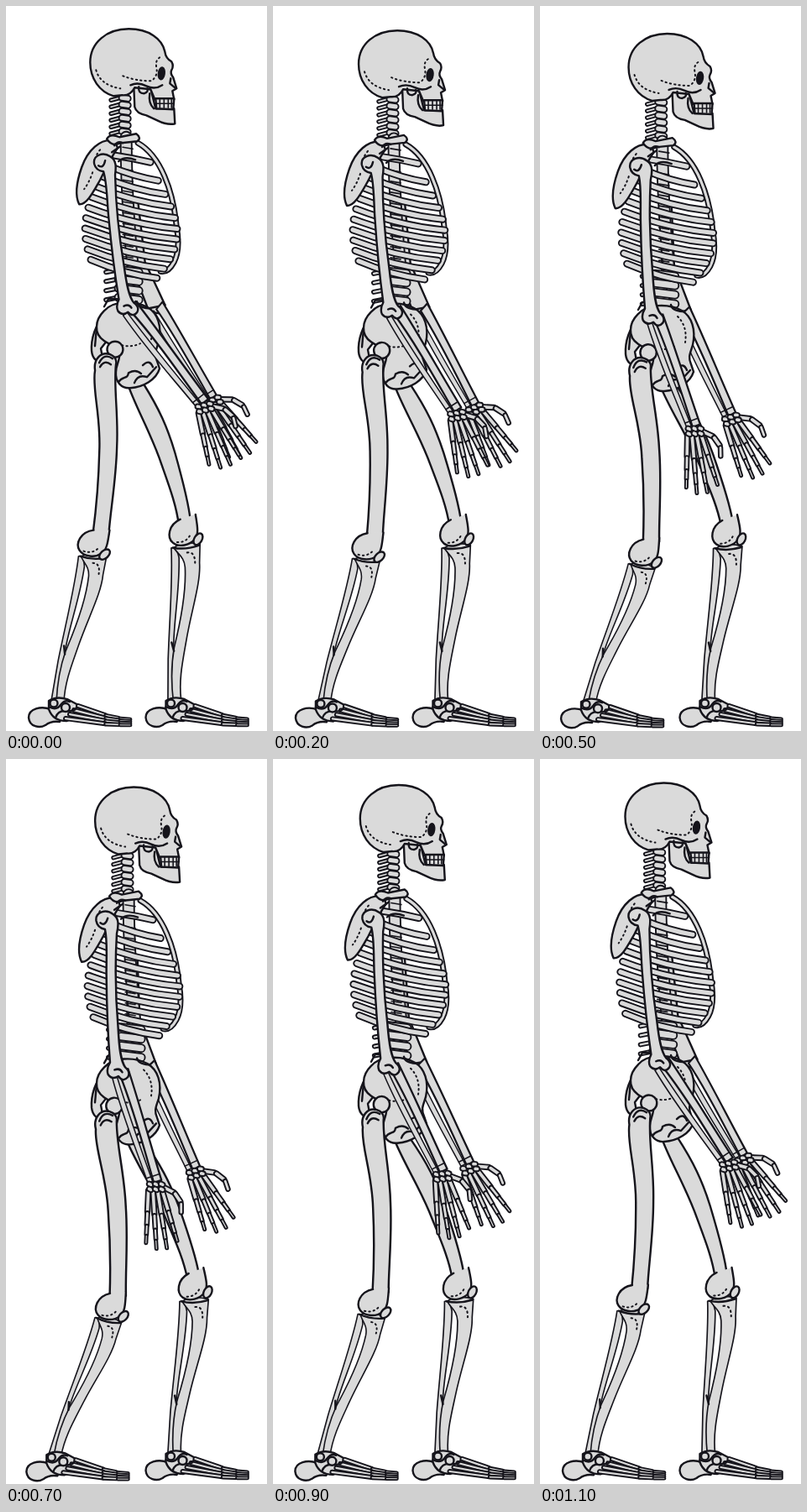
These frames come from a looping animation (311 px wide and 864 px high, 1.2 s). An HTML page:

```html
<!DOCTYPE html>
<html lang="en">
<head>
<meta charset="utf-8">
<title>Walking skeleton</title>
<style>
html, body { margin: 0; width: 100%; height: 100%; overflow: hidden; background: #fff; }
svg { display: block; width: 100%; height: 100%; }
path, circle, ellipse { fill: #dadada; stroke: #15141b; stroke-width: 2.4; stroke-linejoin: round; stroke-linecap: round; }
.line { fill: none; }
.thin { stroke-width: 1.6; }
.dots { fill: none; stroke-width: 2; stroke-dasharray: 1.4 4; }
.dark { fill: #15141b; }
.rim { fill: none; }
.core { fill: none; stroke: #dadada; }
</style>
</head>
<body>
<svg viewBox="0 0 311 864" preserveAspectRatio="none">
<defs>
  <g id="foot">
    <path d="M53 838C42 834 27 837 27 848C28 859 40 861 47 857C52 853 58 852 64 853L68 842Z"/>
    <path d="M51 838L51 828Q60 822 73 826L88 834L86 846L72 852Q56 852 51 838Z"/>
    <g id="toes"></g>
    <path class="line" d="M51 835Q60 840 65 833T76 829M59 848Q62 839 72 840T84 836"/>
    <circle cx="57" cy="831" r="4.5"/><circle cx="71" cy="836" r="5"/>
  </g>
  <g id="knee">
    <path d="M4 -16C-12 -14 -18 0 -13 8C-8 16 6 17 13 12C20 8 21 -3 23 -16"/>
    <path class="dots" d="M-8 9Q3 13 11 4"/>
    <ellipse cx="17" cy="13" rx="7.5" ry="4.6" transform="rotate(-42 17 13)"/>
  </g>
  <g id="shin">
    <path class="thin" d="M86 656C82 692 71 735 62 780L54 827L63 828L70 770C74 742 88 705 93 668Q92 654 86 656Z"/>
    <path class="thin" d="M89 656C92 664 99 668 98 680C95 707 83 740 71 768C65 785 61 805 60 829L69 828C70 805 78 785 86 762C97 730 113 700 115 678L119 657Q102 650 89 656Z"/>
    <path class="line" d="M70 772L69 762M88 656Q102 661 118 658"/>
    <path class="dots" d="M103 664Q112 664 110 677"/>
  </g>
  <g id="forearm">
    <path class="thin" d="M-9 2L-3 2C-4 45 -3 100 -2 140L-8 140C-9 90 -12 50 -9 2Z"/>
    <path d="M1 2L13 -2C13 40 10 95 9 142L-1 142C1 95 4 45 1 2Z"/>
    <path class="line thin" d="M-8 134H9"/>
  </g>
  <g id="hand"></g>
</defs>

<g id="farThigh"><path d="M144 447C153 475 174 510 186 546C196 574 204 595 207 618L221 614C219 592 210 560 202 532C193 502 183 480 164 450Z"/></g>
<g id="farShin"><use href="#shin"/></g>
<g id="farKnee"><use href="#knee"/></g>
<use href="#foot" x="139.5"/>
<g id="farUpper"><path d="M144 230L157 230L166 305L190 356L183 366L171 364L152 315Z"/><path class="line" d="M171 360L190 356"/></g>
<g id="farFore"><use href="#forearm"/></g>
<g id="farHand"><use href="#hand"/></g>

<g id="spine"></g>
<g id="pelvis">
  <path d="M116 372C107 378 101 396 102 411C103 421 110 426 116 424L113 408L124 394Z"/>
  <path class="line" d="M108 383L106 405"/>
  <path d="M117 363C127 351 153 350 169 359C181 366 186 382 182 400C179 410 176 414 180 423L183 432C179 445 164 454 148 455C138 456 130 448 131 436C131 426 138 421 134 406C124 404 107 397 108 382C108 374 112 368 117 363Z"/>
  <path class="line" d="M117 358L122 349H133L137 355M134 448C139 440 145 445 146 437Q155 432 161 438M153 449Q157 438 168 442L179 430M163 428Q171 420 175 430M170 360Q157 359 156 352"/>
  <path class="dots" d="M164 366Q176 378 173 397M138 404Q149 407 160 402"/>
</g>

<g id="thigh">
  <circle cx="130" cy="409" r="9.5"/>
  <path d="M124 415C113 411 104 421 106 434C102 455 113 488 111 530C110 570 107 600 103 630L122 630C124 602 131 565 132 525C134 485 128 455 131 427Q133 419 124 415Z"/>
  <path class="line" d="M111 425Q117 413 127 420M112 430Q117 421 125 427"/>
</g>
<g id="shinNear"><use href="#shin"/></g>
<g id="kneeNear"><use href="#knee"/></g>
<g id="footNear"><use href="#foot"/></g>

<g id="torso">
  <g id="ribs"></g>
  <path d="M129 160C112 157 97 172 90 192C83 212 82 226 87 236C96 237 104 221 112 207C118 195 126 178 133 169Z"/>
  <path class="dots" d="M112 171Q103 182 107 191M103 198Q99 210 93 218"/>
  <path d="M120 158Q124 151 135 156L155 152Q162 157 156 161L137 163Q126 168 120 158Z"/>
  <path class="line" d="M129 166Q133 160 139 163M126 174L136 167M134 185Q141 178 154 183"/>
</g>

<g id="skull">
  <path d="M152 96L153 120Q155 128 167 130L180 136Q192 142 201 140L200 122L178 122L172 98Z"/>
  <path d="M128 107C111 102 100 86 100 67C100 43 120 27 146 27C170 27 186 39 189 54Q190 62 197 66Q200 71 197 76Q195 80 199 85L203 98L198 101L200 111L177 111L172 99L153 97Q148 107 138 106Z"/>
  <path d="M178 110H200L199 123L179 122Z"/>
  <path class="line thin" d="M179 116H200M183 111V121M188 111V121M193 111V121M197 111V121"/>
  <path class="line" d="M148 94Q157 90 167 95T186 94M158 96Q157 104 164 104Q170 102 168 98M171 104Q169 116 176 122M196 86L195 92L201 97"/>
  <ellipse class="dark" cx="185" cy="80" rx="3.4" ry="7" transform="rotate(8 185 80)"/>
  <path class="dots" d="M107 76Q112 94 136 98M139 83Q154 89 173 89Q181 83 179 73T185 60"/>
</g>

<g id="fore"><use href="#forearm"/></g>
<g id="handNear"><use href="#hand"/></g>
<g id="upper">
  <path d="M105 188C103 178 115 173 124 179C132 183 131 193 130 201C131 240 135 275 141 310C144 332 147 347 153 354Q160 359 157 365Q152 372 146 365Q139 370 134 364Q131 358 135 350C130 320 125 280 122 248C120 225 120 210 116 197Q107 196 105 188Z"/>
  <path class="line" d="M110 190Q116 194 118 184M141 358Q147 355 150 360"/>
</g>
</svg>

<script>
const $ = id => document.getElementById(id);
const mix = (a, b, k) => a + (b - a) * k;
const between = (p, q, k, j = k) => [mix(p[0], q[0], k), mix(p[1], q[1], j)];

function path(parent, d, cls, width) {
  const p = document.createElementNS('http://www.w3.org/2000/svg', 'path');
  p.setAttribute('d', d);
  p.setAttribute('class', cls);
  if (width) p.style.strokeWidth = width;
  $(parent).append(p);
}

// A bone drawn as a dark stroke with a lighter one on top
function tube(parent, d, width, edge = 1.9) {
  path(parent, d, 'rim', width);
  path(parent, d, 'core', width - 2 * edge);
}

function drawSpine() {
  for (let y = 109; y < 152; y += 8) {
    tube('spine', `M125 ${y + 3}L136 ${y}`, 5.5);
    tube('spine', `M138 ${y}L145 ${y + 1}`, 9);
  }
  tube('spine', 'M143 156Q143 230 151 312', 15);
  for (let y = 168; y < 310; y += 13) path('spine', `M139 ${y}l12 2`, 'line thin');
  for (let y = 314; y < 350; y += 11) {
    tube('spine', `M119 ${y + 3}L134 ${y}`, 6);
    tube('spine', `M134 ${y}L158 ${y + 3}`, 11);
  }
}

function drawRibs() {
  tube('ribs', 'M157 163C184 178 199 220 203 262Q208 290 200 305Q193 318 184 316', 7);
  for (let k = 1; k > -.01; k -= .1) {
    const x0 = 130 - 36 * Math.sin(2.2 * k), y0 = 178 + 124 * k;
    const x1 = 172 + 32 * Math.sin(2.9 * k), y1 = 186 + 138 * Math.max(k, 0) ** .8;
    tube('ribs', `M${x0} ${y0}Q${mix(x0, x1, .5)} ${y1 - 5} ${x1} ${y1}`, 9);
  }
}

function drawHand() {
  const joints = [0, .42, .66, .84, 1];
  for (let i = 0; i < 4; i++) {
    const base = [-8 + i * 5.5, 8];
    const tip = [-11 + i * 12.6, 80 - 4 * (i - 1.4) ** 2];
    for (let j = 0; j < 4; j++)
      tube('hand', `M${between(base, tip, joints[j])}L${between(base, tip, joints[j + 1] - .03)}`, 7.4 - j * .8);
  }
  tube('hand', 'M8 3L22 10', 7.5);
  tube('hand', 'M24 12L30 21', 7.5);
  tube('hand', 'M31 24L31 34', 6.5);
  for (let y = 0; y < 8; y += 6)
    for (let x = -7; x < 8; x += 7) tube('hand', `M${x} ${y}l2 1`, 7.5);
}

function drawToes() {
  for (let i = 0; i < 4; i++) {
    tube('toes', `M${86 - i * 5} ${834 + i * 5}L118 ${845 + i * 3.4}`, 6);
    tube('toes', `M119 ${845.5 + i * 3.4}L134 ${848.5 + i * 2.6}`, 5.4);
    tube('toes', `M136 ${849 + i * 2.6}L148 ${850 + i * 2.3}`, 4.8);
  }
}

const move = (id, x, y, angle = 0) =>
  $(id).setAttribute('transform', `translate(${x} ${y}) rotate(${angle})`);

const angleOf = (a, b) => Math.atan2(b[1] - a[1], b[0] - a[0]) * 180 / Math.PI;
const span = (a, b) => Math.hypot(b[0] - a[0], b[1] - a[1]);

// Carries a bone from its rest joints a0-b0 to the joints a-b
function place(id, a0, b0, a, b) {
  const turn = angleOf(a, b) - angleOf(a0, b0);
  $(id).setAttribute('transform', `translate(${a}) rotate(${turn}) scale(${span(a, b) / span(a0, b0)}) translate(${-a0[0]} ${-a0[1]})`);
  return turn;
}

// sway runs from 0 (arms forward) to 1 (arms back)
function pose(sway) {
  const soft = Math.sin(sway * Math.PI / 2);
  const late = sway ** 3;
  const dx = 3.5 * sway, dy = 6.5 * sway, drop = 5 * sway;

  move('torso', dx, dy);
  move('spine', dx, dy);
  move('skull', 2 * dx, 7.5 * sway);
  move('pelvis', 0, drop);

  const hip = [130 - sway, 410 + drop];
  const knee = between([99, 640], [122, 655], soft, sway);
  const bend = place('thigh', [130, 410], [100, 641], hip, knee);
  place('shinNear', [100, 641], [61, 826], knee, [61 - 4 * late, 827]);
  move('kneeNear', ...knee, bend);
  move('footNear', -4 * late, 1.5 * sway);

  const farKnee = between([208, 628], [220, 629.5], soft);
  const farBend = place('farThigh', [150, 440], [210, 628], [150 - 2 * sway, 440 + drop], farKnee);
  place('farShin', [100, 641], [61, 826], farKnee, [200, 826]);
  move('farKnee', ...farKnee, farBend - 18);

  const elbow = between([146, 361], [132.5, 377], sway);
  const wrist = between([238, 474], [169, 511], sway);
  place('upper', [117, 185], [146, 362], [117 + dx, 185 + dy], elbow);
  place('fore', [0, 0], [0, 144], elbow, wrist);
  move('handNear', ...wrist, mix(-15, 2, sway));

  const farElbow = between([178, 360], [165, 367], sway);
  const farWrist = between([246, 468], [221, 491], sway, soft);
  place('farUpper', [145, 190], [178, 360], [145 + dx, 190 + dy], farElbow);
  place('farFore', [0, 0], [0, 144], farElbow, farWrist);
  move('farHand', ...farWrist, mix(-26, -18, sway));
}

drawSpine();
drawRibs();
drawHand();
drawToes();

const start = performance.now();
function tick() {
  const step = Math.floor((performance.now() - start) / 100) % 12;
  // A steady swing there and back, a quarter step behind the beat
  pose(1 - Math.abs(1 - Math.abs(step - .25) / 6));
  requestAnimationFrame(tick);
}
tick();
</script>
</body>
</html>
```
